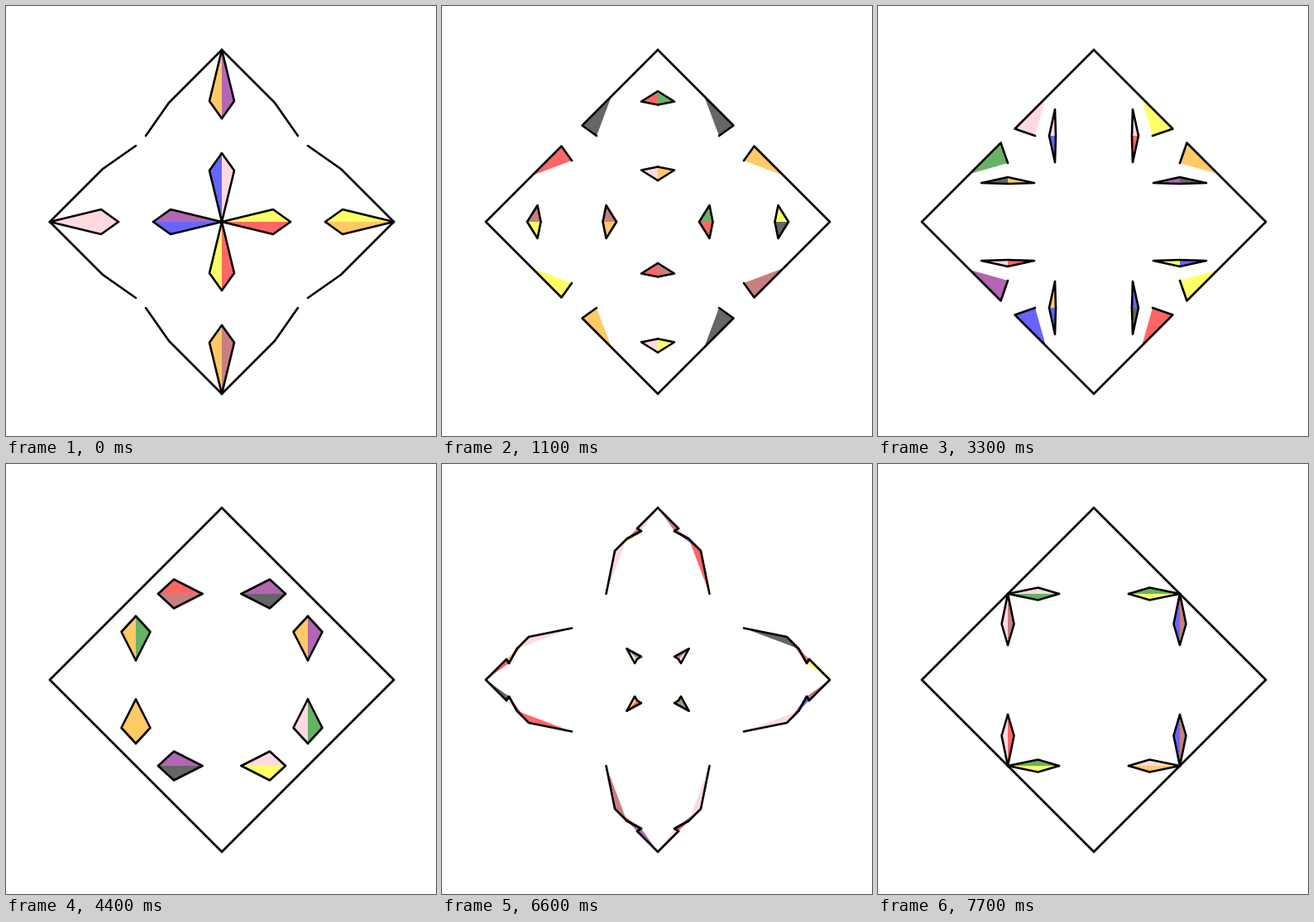
An HTML page with a canvas for the animation above (8 s loop, 520 by 520 pixels).

```html
<!DOCTYPE html>
<html>
<head>
<meta charset="utf-8">
<style>
html, body { margin: 0; width: 100%; height: 100%; overflow: hidden; background: #fff; }
canvas { display: block; }
</style>
</head>
<body>
<canvas id="stage" width="520" height="520"></canvas>
<script>
const ctx = document.getElementById('stage').getContext('2d');
const CENTER = 261, RADIUS = 208, STEP = 1100, LOOP = 8000;
const PAINT = {
  r: 'red', o: 'orange', y: 'yellow', g: 'green', b: 'blue',
  p: 'purple', k: 'pink', n: 'brown', x: 'black'
};
const CORNER = [[104, 104]];

// Points lie in one eighth of the diamond: x runs outward along an axis, y away from it.
// cut: mirrored across x = 104, cutColors holds an outer/inner pair per eighth.
// edge: outline from the tip to the fold, edgeColors fills its last point triples.
// Eighths go clockwise from the one left of the top axis.
const patterns = [
  { cut: [[208, 0], [146, 15], [125, 0]], cutColors: 'obpkyyornroykbkp',
    edge: [[150, 58], [144, 64], [104, 92]], edgeColors: 'gkbkgkbr' },
  { cut: [[158, 0], [145.5, 20], [141.5, 0]], cutColors: 'rkgoygxrynkryonn',
    edge: [[152, 56], [116.5, 91.5], [104, 74]], edgeColors: 'xxonxoyr' },
  { cut: [[177, 0], [160, 12], [140, 0]], cutColors: 'ypkrbogknxyrpkob',
    edge: [[151, 57], [115, 93], [104, 73]], edgeColors: 'okrgybpn' },
  { cut: [[104, 54], [136, 47], [104, 46]], cutColors: 'kbkrxpbyxbbokrxo',
    edge: [[150, 58], [112.5, 95.5], [104, 71]], edgeColors: 'kyoyrbpg' },
  { cut: [[104, 77], [121.5, 58], [104, 23.5]], cutColors: 'rnpxpogkykxpooog',
    edge: CORNER, edgeColors: '' },
  { cut: [[160, 0], [150, 14], [130, 0]], cutColors: 'gorkpybnkrxyogbp',
    edge: CORNER, edgeColors: '' },
  { cut: [[183, 25], [180, 20], [170.5, 37.5]], cutColors: '.g.n.k.g.n.r.o.k',
    edge: [[183, 25], [180, 20], [170.5, 37.5], [156, 52], [104, 62.5]],
    edgeColors: 'kryknkbryrnxnbpkkrpkpprnxkprrook' },
  { cut: [[104, 104], [111.5, 67.5], [104, 42]], cutColors: 'kggynbnbokygkrkn',
    edge: CORNER, edgeColors: '' }
];

function trace(points) {
  ctx.beginPath();
  points.forEach(([x, y]) => ctx.lineTo(x, y));
}

function fill(points, key) {
  if (!PAINT[key]) return;
  trace(points);
  ctx.globalAlpha = 0.6;
  ctx.fillStyle = PAINT[key];
  ctx.fill();
  ctx.globalAlpha = 1;
}

function stroke(points) {
  trace(points);
  ctx.stroke();
}

function eachEighth(draw) {
  for (let i = 0; i < 8; i++) {
    ctx.save();
    ctx.translate(CENTER, CENTER);
    ctx.rotate(((i >> 1) - 1) * Math.PI / 2);
    ctx.scale(1, i % 2 ? 1 : -1);
    draw(i);
    ctx.restore();
  }
}

function drawPattern({ cut, cutColors, edge, edgeColors }) {
  const inner = cut.map(([x, y]) => [RADIUS - x, y]);
  const outline = [[RADIUS, 0], ...edge];
  const triples = edgeColors.length / 8;
  const first = outline.length - 2 - triples;

  ctx.clearRect(0, 0, 520, 520);
  eachEighth(i => {
    fill(cut, cutColors[2 * i]);
    fill(inner, cutColors[2 * i + 1]);
    for (let t = 0; t < triples; t++) {
      fill(outline.slice(first + t, first + t + 3), edgeColors[i * triples + t]);
    }
  });

  ctx.lineWidth = 2.6;
  ctx.lineJoin = ctx.lineCap = 'round';
  eachEighth(() => [cut, inner, outline].forEach(stroke));
}

const start = performance.now();
function frame() {
  const time = (performance.now() - start) % LOOP;
  drawPattern(patterns[Math.floor(time / STEP)]);
  requestAnimationFrame(frame);
}
frame();
</script>
</body>
</html>
```
